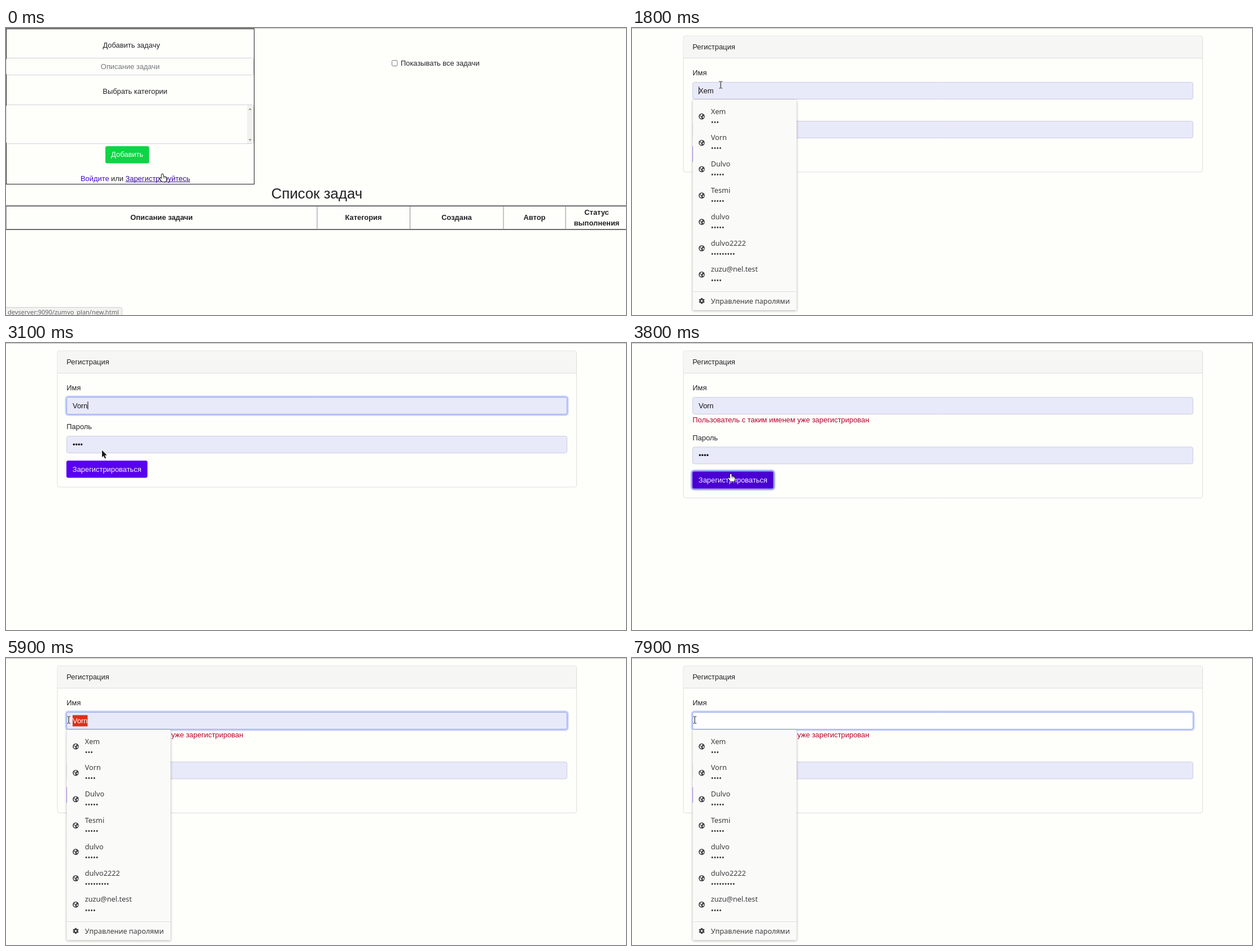
Recreate the animation shown at these times as an HTML page with a canvas. Size 1098 px wide and 510 px high, loop 8000 ms.

```html
<!DOCTYPE html>
<html lang="ru">
<head>
<meta charset="utf-8">
<title>Регистрация</title>
<style>
html, body { margin: 0; width: 100%; height: 100%; overflow: hidden; background: #fefffb; }
canvas { display: block; }
</style>
</head>
<body>
<canvas id="stage" width="1098" height="510"></canvas>
<script>
const ctx = document.getElementById('stage').getContext('2d');
const LOOP = 8000, STEP = 100;
const PAGE = '"Liberation Sans", Arial, sans-serif';
const UI = '"Noto Sans", "Open Sans", sans-serif';
const BG = '#fefffb', INK = '#212125', FILL = '#e8e9f9';
const SHIFT = 19.3;

const accounts = [
  ['Xem', 3], ['Vorn', 4], ['Dulvo', 5], ['Tesmi', 5],
  ['dulvo', 5], ['dulvo2222', 9], ['zuzu@nel.test', 4]
];

// Pointer path: time, x, y
const path = [
  [0, 277, 259], [300, 277, 259], [400, 272, 266], [600, 272, 266],
  [700, 278, 268], [1000, 278, 268], [1700, 157, 101], [2100, 157, 101],
  [2500, 172, 199], [2700, 172, 199], [2900, 170, 190], [3100, 170, 190],
  [3400, 175, 232], [4600, 175, 232], [4700, 175, 219], [4800, 175, 219],
  [4900, 171, 149], [5000, 171, 149], [5300, 150, 111], [5500, 150, 111],
  [5800, 111, 110], [LOOP, 111, 110]
];

const clamp = (v, a = 0, b = 1) => Math.min(b, Math.max(a, v));
const during = (t, a, b) => t >= a && t < b;

function pointerAt(t) {
  const i = path.findIndex(p => p[0] > t);
  const [t0, x0, y0] = path[i - 1], [t1, x1, y1] = path[i];
  const k = (t - t0) / (t1 - t0);
  return { x: x0 + (x1 - x0) * k, y: y0 + (y1 - y0) * k };
}

function text(s, x, y, { size = 12.9, color = INK, align = 'left', font = PAGE, weight = 400 } = {}) {
  ctx.font = `${weight} ${size}px ${font}`;
  ctx.fillStyle = color;
  ctx.textAlign = align;
  ctx.fillText(s, x, y);
  return ctx.measureText(s).width;
}

function rect(x, y, w, h, color) {
  ctx.fillStyle = color;
  ctx.fillRect(x, y, w, h);
}

function box(x, y, w, h, r, fill, stroke, line = 1) {
  ctx.beginPath();
  ctx.roundRect(x, y, w, h, r);
  if (fill) { ctx.fillStyle = fill; ctx.fill(); }
  if (stroke) { ctx.strokeStyle = stroke; ctx.lineWidth = line; ctx.stroke(); }
}

function poly(points, fill, stroke, line = 1) {
  ctx.beginPath();
  points.forEach(([x, y]) => ctx.lineTo(x, y));
  ctx.closePath();
  if (stroke) { ctx.strokeStyle = stroke; ctx.lineWidth = line; ctx.stroke(); }
  ctx.fillStyle = fill;
  ctx.fill();
}

function disc(x, y, r, color) {
  ctx.beginPath();
  ctx.arc(x, y, r, 0, Math.PI * 2);
  ctx.fillStyle = color;
  ctx.fill();
}

function focusRing(x, y, w, h, alpha) {
  if (alpha > 0) box(x - 1.5, y - 1.5, w + 3, h + 3, 4.5, null, `rgba(80,105,250,${alpha})`, 3);
}

function drawStatus() {
  box(-4, 496.5, 209.5, 20, 3, '#f2f2ef', '#cfcfcb');
  text('devserver:9090/zumvo_plan/new.html', 3, 509, { size: 11, color: '#66666a', font: UI });
}

function drawTasks() {
  const mid = { align: 'center' };
  rect(0, 1, 440, 277, '#1c1c1c');
  rect(1, 2, 438, 275, BG);
  text('Добавить задачу', 222, 35, mid);
  box(.5, 53.5, 438, 30, 3, BG, '#ced2d8');
  text('Описание задачи', 220, 73, { align: 'center', color: '#74777c' });
  text('Выбрать категории', 228.5, 117, mid);
  box(.5, 136.5, 438, 69, 3, BG, '#ced2d8');
  rect(427, 137, 11, 68, '#f1f1ef');
  poly([[429.5, 145.5], [435, 145.5], [432.2, 142.5]], '#8a8a8a');
  poly([[429.5, 197.5], [435, 197.5], [432.2, 200.5]], '#8a8a8a');
  box(176, 210, 77.5, 30.5, 3, '#0fd445');
  text('Добавить', 214.6, 229, { align: 'center', color: '#f4fff4' });

  text('Войдите', 132, 272, { color: '#4806d6' });
  text('или', 186, 272);
  const w = text('Зарегистрируйтесь', 211.5, 272, { color: '#35089a' });
  rect(211.5, 273, w, 1, '#35089a');

  box(683.5, 57.5, 9.5, 10, 2, '#fff', '#77777a');
  text('Показывать все задачи', 699, 67, mid.left);
  text('Список задач', 550.5, 302.5, { size: 25.8, align: 'center' });

  rect(0, 315.5, 1098, 1.5, '#3c3c3e');
  rect(0, 357.3, 1098, 1.5, '#3c3c3e');
  for (const x of [0, 550.5, 715, 880.5, 990.5]) rect(x, 317, 1, 41, '#8c8c8e');
  const head = { align: 'center', weight: 700 };
  text('Описание задачи', 275.5, 341.3, head);
  text('Категория', 633, 341.3, head);
  text('Создана', 798, 341.3, head);
  text('Автор', 936, 341.3, head);
  text('Статус', 1046, 331.6, head);
  text('выполнения', 1046, 351, head);
}

function drawField(y, filled, ring) {
  const h = 30;
  focusRing(107.5, y, 886, h, ring * .32);
  box(107.5, y, 886, h, 3, filled ? FILL : '#fff', ring > 0 ? '#92a6ee' : '#cbcede');
}

// Text selected from its right end back to x
function drawSelection(name, x) {
  ctx.font = `12.9px ${PAGE}`;
  const end = 118 + ctx.measureText(name).width, from = Math.max(118, x);
  if (from >= end) return;
  ctx.save();
  ctx.beginPath();
  ctx.rect(from, 101.5, end - from, 20);
  ctx.clip();
  rect(110, 100, 60, 24, '#d6331c');
  text(name, 118, 115.5, { color: '#fff' });
  ctx.restore();
}

function drawForm(s) {
  const dy = s.error ? SHIFT : 0;
  box(91, 14, 919.5, 242 + dy, 3.5, BG, '#dcdedb');
  box(91.5, 14.5, 918.5, 39, [3, 3, 0, 0], '#f6f7f4');
  rect(91, 53, 919.5, 1, '#dcdedb');
  text('Регистрация', 107.3, 38);
  text('Имя', 107.3, 84);

  drawField(96.5, s.filled, s.ring);
  const w = text(s.name, 118, 115.5, { color: s.filled ? '#101014' : '#43484e' });
  if (s.select !== null) drawSelection(s.name, s.select);
  if (s.caret !== null) rect(118 + (s.caret ? w : 0), 104, 1, 14, '#111');

  if (s.error) text('Пользователь с таким именем уже зарегистрирован', 107.3, 140.5, { color: '#b4002e' });
  text('Пароль', 107.3, 153.3 + dy);
  drawField(165.5 + dy, s.secret, 0);
  text('•'.repeat(s.secret), 118, 184.7 + dy, { color: '#101014' });

  const by = 209 + dy;
  focusRing(107, by, 143.5, 30.5, s.buttonRing * .55);
  box(107, by, 143.5, 30.5, 3, s.hover ? '#4a00d2' : '#5900f0');
  text('Зарегистрироваться', 178.8, by + 19.6, { align: 'center', color: '#f6f2ff' });
}

function globe(x, y) {
  disc(x, y, 5.4, '#3c3d40');
  poly([[x - 4, y - 1.6], [x - .6, y + 1.4], [x - .6, y + 4.2], [x - 3.4, y + 2.4]], '#f4f4f2');
  poly([[x - 1, y - 4.2], [x + 1.6, y - 3.6], [x + .8, y - 1.4], [x - 1.4, y - .4], [x - 2.6, y - 1.8]], '#f4f4f2');
  poly([[x + 1, y], [x + 2.6, y + .4], [x + 4.2, y - 1.6], [x + 4, y + 1.8], [x + 2.2, y + 2.8]], '#f4f4f2');
}

function gear(x, y) {
  for (let i = 0; i < 6; i++) {
    ctx.save();
    ctx.translate(x, y);
    ctx.rotate(i * Math.PI / 3);
    rect(-1.4, -5.2, 2.8, 3, '#3c3d40');
    ctx.restore();
  }
  disc(x, y, 3.9, '#3c3d40');
  disc(x, y, 1.7, '#fafaf8');
}

function drawMenu(active) {
  ctx.save();
  ctx.shadowColor = 'rgba(0,0,0,.32)';
  ctx.shadowBlur = 4;
  ctx.shadowOffsetY = 1;
  box(107.5, 127.5, 184, 374, 2, '#fafaf8');
  ctx.restore();
  const ui = { font: UI, color: '#3c3c40', size: 12.7 };
  accounts.forEach(([name, dots], i) => {
    const y = 157.2 + i * 46.83;
    if (i === active) rect(107.5, y - 23, 184, 46.8, '#ebebe9');
    globe(123.5, y);
    text(name, 139.7, y - 4.7, ui);
    text('•'.repeat(dots), 139.7, y + 14.4, ui);
  });
  rect(107.5, 468, 184, 1, '#dededb');
  gear(123.5, 485);
  text('Управление паролями', 139.7, 489.7, { ...ui, size: 12.5 });
}

function drawArrow(x, y) {
  poly([[0, 0], [0, 12.4], [2.9, 9.8], [5, 14.6], [7.1, 13.6], [5, 9], [8.8, 8.8]]
    .map(([a, b]) => [x + a, y + b + .6]), '#1a1a1a', '#fff', 1.6);
}

function drawBeam(x, y) {
  const marks = [[-3, -6.5, 2.6, 1], [.6, -6.5, 2.6, 1], [-.5, -6, 1.2, 12], [-3, 5.5, 2.6, 1], [.6, 5.5, 2.6, 1]];
  for (const [a, b, w, h] of marks) rect(x + a - .6, y + b - .6, w + 1.2, h + 1.2, 'rgba(255,255,255,.6)');
  for (const [a, b, w, h] of marks) rect(x + a, y + b, w, h, '#2a2a2a');
}

function drawHand(x, y) {
  ctx.lineJoin = 'round';
  poly([[-1.3, 1], [0, 0], [1.3, 1], [1.3, 5], [3.4, 4.8], [5.2, 5.4], [7, 6.2], [7.2, 9.5], [5.8, 13.5],
    [-.8, 13.5], [-2.6, 10.6], [-4.8, 7.8], [-3.6, 6.8], [-1.3, 8.4]]
    .map(([a, b]) => [x + a, y + b + .5]), '#fff', '#1a1a1a', 2);
  for (const a of [1.4, 3.2, 5]) rect(x + a, y + 5.6, .7, 3, '#555');
  ctx.lineJoin = 'miter';
}

function formState(t, p) {
  const s = {
    name: '', secret: 0, filled: true, error: t >= 3800, select: null, caret: null,
    ring: 0, buttonRing: 0, menu: during(t, 1800, 2800) || during(t, 5400, 7100) || t >= 7900,
    active: -1, hover: during(t, 3400, 4700)
  };
  if (t < 1100) s.filled = false;
  else if (t < 2400) { s.name = 'Xem'; s.secret = 3; }
  else if (t < 7000) { s.name = 'Vorn'; s.secret = 4; }
  else {
    s.filled = false;
    s.secret = 4;
    s.name = t >= 7900 ? '' : during(t, 7200, 7500) ? 'Щд' : 'Щ';
  }
  if (s.menu && t < 2800 && p.y > 134) s.active = Math.floor((p.y - 134) / 46.83);

  if (t < 3700) s.ring = clamp((t - 1800) / 150);
  else if (t < 5300) s.ring = clamp(1 - (t - 3600) / 200);
  else s.ring = clamp((t - 5300) / 150);
  s.buttonRing = t < 5300 ? clamp((t - 3600) / 200) : clamp(1 - (t - 5300) / 150);

  if (during(t, 1800, 2200)) s.caret = 0;
  else if (during(t, 3100, 3400) || during(t, 7000, 7600)) s.caret = 1;
  if (during(t, 5600, 7000)) s.select = p.x;
  return s;
}

function draw(now) {
  const t = Math.floor(now % LOOP / STEP) * STEP;
  const p = pointerAt(t);
  rect(0, 0, 1098, 510, BG);
  rect(0, 0, 1098, 1, '#b9bab6');
  if (t < 900) {
    drawTasks();
    drawHand(p.x, p.y);
  } else {
    const s = formState(t, p);
    drawForm(s);
    if (s.menu) drawMenu(s.active);
    if (s.hover) drawHand(p.x, p.y);
    else if (p.y > 96 && p.y < 127) drawBeam(p.x, p.y);
    else drawArrow(p.x, p.y);
  }
  if (t < 1300) drawStatus();
}

let start = null;
function tick(now) {
  start ??= now;
  draw(now - start);
  requestAnimationFrame(tick);
}
draw(0);
requestAnimationFrame(tick);
</script>
</body>
</html>
```
